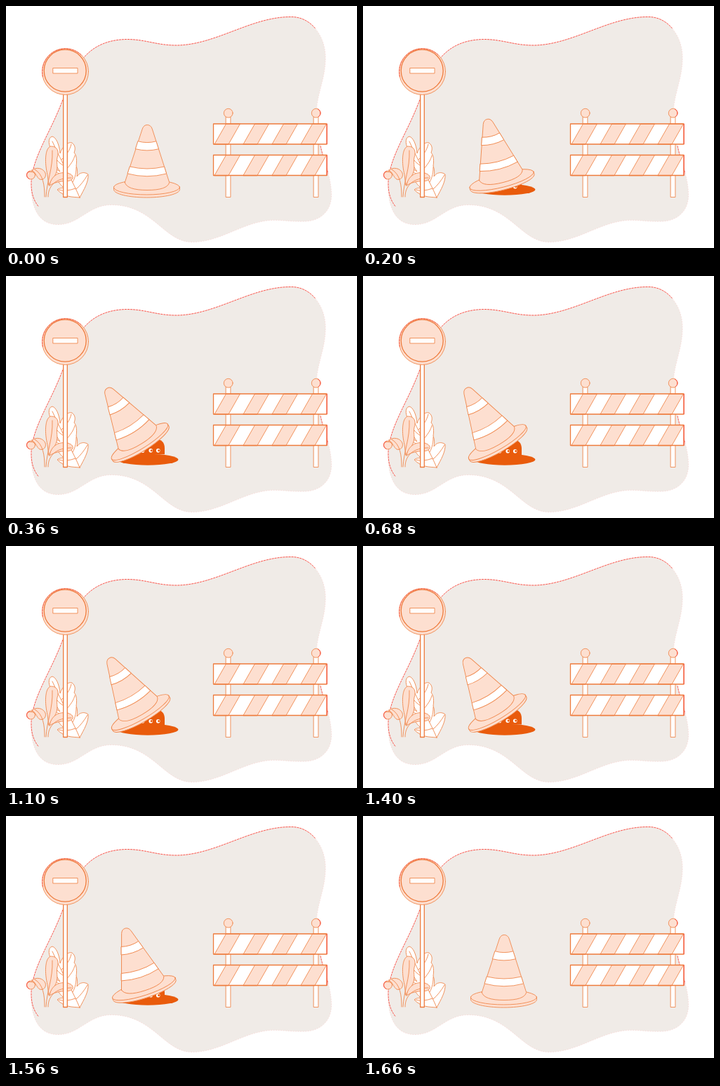
These frames come from a looping animation (500 by 345 pixels, 2.28 s). An HTML page:

```html
<!DOCTYPE html>
<html lang="en">
<head>
<meta charset="utf-8">
<title>Road works</title>
<style>
  html, body { margin: 0; width: 100%; height: 100%; overflow: hidden; background: #fff; }
  svg { display: block; width: 100%; height: 100%; }

  /* 0 = cone down, 1 = cone lifted */
  @property --lift { syntax: "<number>"; inherits: true; initial-value: 0; }

  .scene { animation: lift 2280ms cubic-bezier(.37, 0, .63, 1) infinite; }
  .cone {
    transform-origin: 156.2px 264.9px;
    transform: rotate(calc(var(--lift) * -30.2deg));
  }
  .critter { transform: translateY(calc((1 - var(--lift)) * 15px)); }

  /* springs open, then the same spring backwards */
  @keyframes lift {
    0%, 4.95% { --lift: 0; }
    13.55%    { --lift: 1.11; }
    19.25%    { --lift: .96; }
    24.96%    { --lift: 1.01; }
    28.6%, 47.8% { --lift: 1; }
    53.03%    { --lift: 1.01; }
    58.73%    { --lift: .96; }
    64.43%    { --lift: 1.11; }
    72.9%, 100% { --lift: 0; }
  }

  .line  { stroke: #f08a50; stroke-width: .9; stroke-linejoin: round; stroke-linecap: round; }
  .bold  { stroke: #ee7b3c; stroke-width: 1.3; }
  .pink  { fill: #fddfd0; }
  .white { fill: #fff; }
  .none  { fill: none; }
  .hot   { fill: #e95b0c; }
  .red   { fill: none; stroke: #fb4a40; stroke-width: .9; }
  .dash  { stroke-dasharray: 3 1; }
  .faint { stroke: #f7dcd8; stroke-dasharray: 2 1.5; }
</style>
</head>
<body>
<svg class="scene" viewBox="0 0 500 345" preserveAspectRatio="none">
  <defs>
    <path id="blob" d="M36 250C38 215 62 182 79 138C93 104 104 48 172 47C200 47 215 56 245 55.500C300 54 350 15 405 15C434 14 455 42 455 73C455 105 442 125 442 155C442 200 464 235 463.500 270C463 292 448 306 425 306.500C405 307 390 304 375 305C335 309 305 336 265 336C225 336 210 283 150 283C117 283 105 311 74 311C45 311 35 285 36 250Z"/>
    <g id="post">
      <rect class="line white" x="-3.2" y="158" width="6.4" height="114.5"/>
      <circle class="line pink" cy="152.7" r="6.4"/>
    </g>
    <path id="stripe" class="line pink" d="M297 29L313.500 0H333.500L317 29Z"/>
    <g id="board">
      <rect class="white" x="295.500" width="161.500" height="29"/>
      <use href="#stripe"/>
      <use href="#stripe" x="41"/>
      <use href="#stripe" x="82"/>
      <use href="#stripe" x="123"/>
      <rect class="line bold none" x="295.500" width="161.500" height="29"/>
      <path class="red" d="M457.200 0V29"/>
    </g>
    <g id="eye">
      <circle class="white" r="2.800"/>
      <circle class="hot" cx="1" cy="-.2" r="1.500"/>
    </g>
  </defs>

  <!-- backdrop -->
  <g transform="translate(0 .5)">
    <use href="#blob" fill="#f0ebe7"/>
    <use href="#blob" class="red faint"/>
    <path class="red dash" d="M46 285C39 276 35.500 265 36 250C38 215 62 182 79 138C93 104 104 48 172 47C200 47 215 56 245 55.500C300 54 350 15 405 15C419.500 14.500 432 21 441 32"/>
    <path class="red dash" d="M448 199Q452 217 459 238"/>
  </g>

  <!-- plants -->
  <g class="line">
    <path class="white" d="M105 273C94 272 84 273 73 262C76 259 80 260 82 259C76 253 69 245 68 234C71 232 74 234 77 236C70 226 66 217 67 208C60 200 59 187 66 186C71 187 76 197 77 210C80 201 88 193 94 195C99 199 99 204 97 209C101 213 101 222 100 228C102 233 102 239 101 243C105 237 112 236 117 240C118 250 111 262 105 273Z"/>
    <path class="none" d="M105 273C96 252 80 224 66 193M79 219C85 214 91 206 93 197M86 233C92 226 97 219 98 213M95 251C99 244 100 237 100 230M100 261C106 256 112 248 116 241M83 228Q74 224 69 214M91 243Q78 243 70 235M99 260Q86 265 75 262"/>
    <path class="pink" d="M59 240C55 225 55 202 64 200C73 200 76 207 73 216C71 225 76 232 69 243C66 248 63 251 61 255Z"/>
    <path class="none" d="M57 272C58 250 67 232 66 206"/>
    <path class="pink" d="M37 234C43 229 53 231 56 238C58 244 53 249 48 247C44 245 43 238 37 234Z"/>
    <path class="none" d="M55 272C55 255 53 240 41 233"/>
    <circle class="pink" cx="35.500" cy="241" r="6"/>
    <path class="none" d="M31 237Q39 235 41 239"/>
    <path class="red" d="M33 235.500A6 6 0 0 0 33 246.500"/>
    <path class="pink" d="M62 256C64 243 74 236 86 238C93 239 96 242 95 246C91 251 85 249 79 250C72 251 66 253 62 256Z"/>
    <path class="none" d="M60 272C60 257 70 245 93 245"/>
  </g>

  <!-- sign -->
  <rect class="line bold white" x="81.700" y="124" width="5.600" height="148.500"/>
  <circle class="line pink" cx="84.500" cy="93.500" r="33"/>
  <path class="red dash" d="M52.500 101A33 33 0 0 1 108 70.500"/>
  <circle class="line bold pink" cx="84.200" cy="92.200" r="30"/>
  <rect class="line white" x="67.200" y="88.500" width="34.800" height="7.500"/>

  <!-- barrier -->
  <use href="#post" x="316.700"/>
  <use href="#post" x="441.700"/>
  <path class="red" d="M444 146.700A6.400 6.400 0 0 1 445 158"/>
  <use href="#board" y="168"/>
  <use href="#board" y="212.500"/>

  <!-- hole and its tenant -->
  <ellipse class="hot" cx="202" cy="261.700" rx="43.500" ry="8"/>
  <g class="critter">
    <path class="hot" d="M184 255V248C186 238 198 233 212 233C221 233 226 238 226 246V255Z"/>
    <use href="#eye" x="194.500" y="250"/>
    <use href="#eye" x="206.200" y="249.700"/>
    <use href="#eye" x="216.700" y="249.700"/>
  </g>

  <!-- cone -->
  <g class="cone line">
    <path class="pink" d="M153.500 258V261.500C153.500 268 174.500 273 200.500 273S247.500 268 247.500 261.500V258Z"/>
    <ellipse class="pink" cx="200.500" cy="258.500" rx="47" ry="10.500"/>
    <path class="pink" d="M169.300 251.500L194.300 175Q196.300 169.500 201.200 169.500T208.200 175L232.700 251.500Q230 262.500 201 262.500T169.300 251.500Z"/>
    <path class="white" d="M188.200 192.800Q201 196.500 213.900 192.800L217.400 203.800Q201 208 184.700 203.800Z"/>
    <path class="white" d="M176.600 229Q201 235 225.500 229L228.600 239Q201 246.500 173.400 239Z"/>
  </g>
</svg>
</body>
</html>
```
